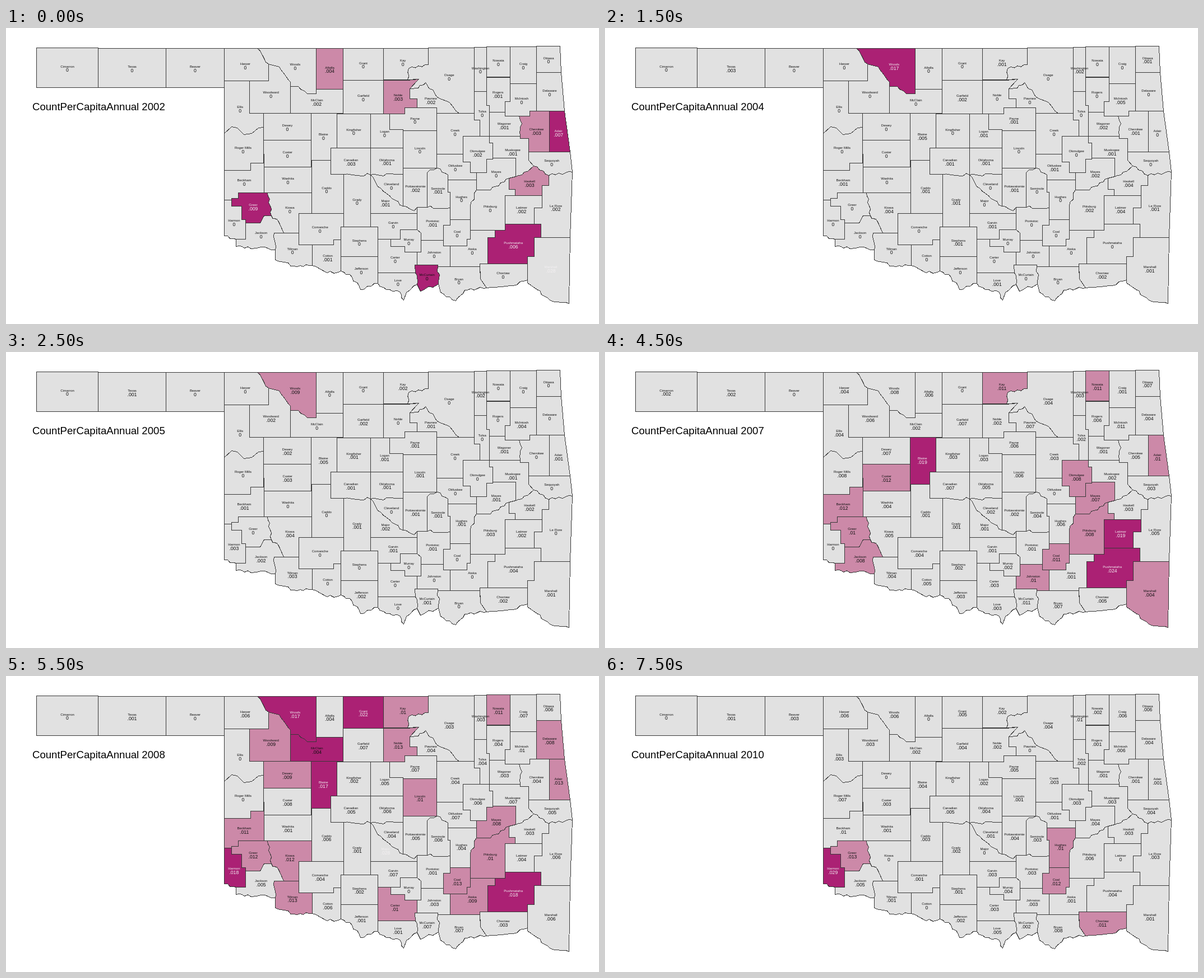
Write an HTML page that moves like this. It is 1058 px wide and 529 px high and loops after 8 s.

```html
<!DOCTYPE html>
<html lang="en">
<head>
<meta charset="utf-8">
<title>Count per capita by county</title>
<style>
html, body { margin: 0; width: 100%; height: 100%; overflow: hidden; background: #fff; }
svg { display: block; width: 100%; height: 100%; font-family: "Liberation Sans", Arial, sans-serif; }
polygon { stroke: #383838; stroke-width: 1; stroke-linejoin: round; shape-rendering: crispEdges; }
#labels { text-anchor: middle; }
.name { font-size: 6px; }
.value { font-size: 8.7px; }
#title { font-size: 18.6px; }
</style>
</head>
<body>
<svg viewBox="0 0 1058 529">
  <g id="shapes" transform="translate(.5 .5)"></g>
  <g id="labels" transform="translate(.5 .5)"></g>
  <text id="title" x="47" y="147"></text>
</svg>
<script>
const FILLS = ['#e1e1e1', '#cc89a8', '#ab2174'];
const INKS = ['#111', '#111', '#f3f0f2'];
const FIRST_YEAR = 2002;

// Known years with the lowest value of the middle and the high class.
const surveys = [
  { year: 2002, limits: [2.7, 6] },
  { year: 2004, limits: [10, 15] },
  { year: 2006, limits: [2.9, 5.2] },
  { year: 2007, limits: [8.2, 15] },
  { year: 2008, limits: [8.2, 16] },
  { year: 2010, limits: [10.2, 20] }
];

// Some outlines carry the data of another county's label.
const swapped = {};
for (const [a, b] of [['McClain', 'Major'], ['Marshall', 'McCurtain'], ['Mayes', 'McIntosh']]) {
  swapped[a] = b;
  swapped[b] = a;
}

const byId = id => document.getElementById(id);
const counties = {};

function add(parent, tag, attrs) {
  const node = document.createElementNS('http://www.w3.org/2000/svg', tag);
  for (const key in attrs) node.setAttribute(key, attrs[key]);
  return byId(parent).appendChild(node);
}

// Seeded by its ends, so that both neighbours get the same river.
function river(from, to) {
  const flipped = from[0] > to[0] || (from[0] === to[0] && from[1] > to[1]);
  const [a, b] = flipped ? [to, from] : [from, to];
  const dx = b[0] - a[0], dy = b[1] - a[1], length = Math.hypot(dx, dy);
  const steps = Math.max(2, Math.round(length / 6));
  const points = [];
  for (let i = 1; i < steps; i++) {
    const noise = Math.sin(a[0] * 12.9 + a[1] * 78.2 + i * 37.7) * 43758;
    const shift = (noise - Math.floor(noise) - .5) * 5 / length;
    points.push([a[0] + dx * i / steps - dy * shift, a[1] + dy * i / steps + dx * shift]);
  }
  return [...(flipped ? points.reverse() : points), to];
}

// "x,y" is a corner, "Hx" and "Vy" straight sides, "~x,y" a river.
function trace(outline) {
  const points = [];
  for (const step of outline.split(' ')) {
    const last = points[points.length - 1];
    const rest = step.slice(1);
    if (step[0] === 'H') points.push([+rest, last[1]]);
    else if (step[0] === 'V') points.push([last[0], +rest]);
    else if (step[0] === '~') points.push(...river(last, rest.split(',').map(Number)));
    else points.push(step.split(',').map(Number));
  }
  return points;
}

function centroid(points) {
  let area = 0, x = 0, y = 0;
  points.forEach(([ax, ay], i) => {
    const [bx, by] = points[(i + 1) % points.length];
    const cross = ax * by - bx * ay;
    area += cross * 3;
    x += (ax + bx) * cross;
    y += (ay + by) * cross;
  });
  return [x / area, y / area];
}

// The series ends with the last survey; earlier missing values are zero.
function county(name, series, outline) {
  const points = trace(outline);
  const [x, y] = centroid(points);
  const shape = add('shapes', 'polygon', { points: points.join(' ') });
  const label = add('labels', 'text', { class: 'name', x, y: y - .5 });
  const value = add('labels', 'text', { class: 'value', x, y: y + 7.3 });
  const known = series.split(' ').map(Number);
  const values = [...Array(surveys.length - known.length).fill(0), ...known];
  label.textContent = name;
  counties[name] = { shape, label, value, values };
}

county('Cimarron', '2 0 0', '54,35 H164 V106 H54');
county('Texas', '3 0 2 1 1', '164,36 H285 V106 H164');
county('Beaver', '3', '285,36 H389 V106 H285');
county('Harper', '4 6 6', '389,36 H448 ~468,64 V94 H389');
county('Woods', '17 1 8 17 6', '448,36 ~468,64 487,69 ~507,96 V104 H521 ~537,117 H553 V36');
county('Alfalfa', '4 0 0 6 4 0', '553,36 H601 V109 H553');
county('Grant', '22 5', '601,36 H673 V93 H601');
county('Kay', '1 4 11 10 2', '673,36 H753 V65 ~718,72 ~716,92 H673');
county('Osage', '1 4 3 4', '753,35 V65 ~718,72 ~716,92 736,91 ~720,108 735,107 ~748,97 ~772,125 790,132 ~808,152 H835 V35');
county('Washington', '2 3 3 3 10', '835,34 H857 V113 H835');
county('Nowata', '1 11 11 2', '857,33 H899 V87 H857');
county('Craig', '1 7 6', '899,33 H946 V99 H899');
county('Ottawa', '1 0 7 6 6', '946,32 H988 990,79 H946');
county('Delaware', '1 4 8.4 4', '946,79 H990 996,148 H946');
county('Woodward', '4 6 9 3', '468,64 487,69 ~507,96 V152 H434 V94 H468');
county('Ellis', '4 0 3', '389,94 H434 V152 H459 V177 450,178 438,188 424,190 412,178 402,176 389,188');
county('McClain', '2 0 1 2 4 2', '507,104 H521 ~537,117 H553 V109 H602 V152 H507');
county('Garfield', '2 3 7 7 4', '601,93 H673 V153 H601');
county('Noble', '3 0 0 2 13 2', '673,93 H716 736,91 ~720,108 V126 H733 V142 H711 V153 H673');
county('Pawnee', '2 0 3 7 4 0', '720,108 735,107 ~748,97 ~772,125 790,132 ~808,152 H768 V142 H733 V126 H720');
county('Rogers', '1 0 1 6 4 1', '857,88 H899 V131 H890 V150 H862 V138 H857');
county('McIntosh', '5 4 11 10 6', '899,99 H946 V148 H934 V157 H890 V131 H899');
county('Tulsa', '2 4 2', '835,113 H857 V138 H862 V193 H845 V164 H835');
county('Wagoner', '1 2 0 1 3 1', '862,150 H890 V157 H915 ~920,171 ~917,193 H862');
county('Cherokee', '3 1 0 5 4 1', '934,148 H969 V221 H932 V197 H917 V193 ~920,171 ~915,157 H934');
county('Adair', '7 0 3 10 13 1', '969,148 H996 1006,221 H969');
county('Dewey', '5 7 9 0', '459,152 H544 V200 H459');
county('Blaine', '5 6 19 17 4', '544,152 H590 V214 H579 V236 H544');
county('Kingfisher', '2 3 2 0', '590,153 H650 V214 H590');
county('Logan', '1 1 3 5 2', '650,153 H684 V181 H708 V214 H650');
county('Payne', '1 1 6 7 5', '711,142 H768 V183 H708 V181 H684 V153 H711');
county('Creek', '3 4 3', '768,152 H835 V164 H845 V193 H815 V225 H768');
county('Lincoln', '2 6 10 1', '708,183 H768 V250 H708');
county('Roger Mills', '8 0 7', '389,188 402,176 412,178 424,190 438,188 450,178 459,177 V241 H436 V254 H389');
county('Custer', '6 12 8 3', '459,200 H544 V248 H460');
county('Canadian', '2.6 1 2 7 5 5', '579,214 H650 V262 ~602,261 H579');
county('Oklahoma', '1 1 1 5 6 4', '650,214 H708 V261 ~650,262');
county('Okmulgee', '2 0 0 8.4 6 3', '815,193 H862 V205 H868 V234 H857 V258 H828 V239 H815');
county('Muskogee', '1 1 1 2 7 3', '862,193 H917 V197 H932 V236 941,246 930,256 ~909,265 V232 H868 V205 H862');
county('Okfuskee', '1 0 0 7 1', '768,225 H815 V239 H828 V258 H839 V271 H788 V262 ~768,250');
county('Sequoyah', '1 3 5 4', '932,221 H1006 1010,257 ~968,263 ~941,246 932,236');
county('Mayes', '2 0 7 8 4', '857,234 H868 V232 H909 V265 897,268 ~864,289 H839 V258 H857');
county('Haskell', '3 4 0 3 3 3', '897,268 909,265 ~930,256 941,246 ~968,263 V281 H956 V299 H908 V288 H897');
county('Beckham', '1 2 12 11 10', '389,254 H436 V241 H460 V294 H414 V304 H402 V307 H389');
county('Washita', '4 1 1', '460,248 H545 V294 H460');
county('Caddo', '1 0 1 6 3', '545,236 H579 V261 H602 V331 H545');
county('Grady', '1 1 1 1 2', '602,261 ~650,262 V355 H602');
county('Cleveland', '2 4 1', '650,262 ~708,261 V318 ~688,304 ~668,286 ~650,262');
county('Major', '1 0 4 1 28 0', '650,262 ~668,286 ~688,304 ~708,318 ~728,326 733,320 V331 H650');
county('Pottawatomie', '2 1 2 2 5 4', '708,250 H768 ~751,258 V320 H733 728,326 ~708,318');
county('Seminole', '1 0 2 4 6 3', '751,258 ~768,250 ~788,262 V293 H792 V321 ~751,320');
county('Hughes', '3 6 4 10.4', '788,271 H839 V289 ~828,316 V342 H792 V293 H788');
county('Pittsburg', '2 4 8.4 10 6', '839,289 H864 ~897,268 V288 H908 V299 H890 V361 H828 V316 ~839,289');
county('Latimer', '2 4 1 19 4 0', '890,299 H956 V321 H942 V350 H890');
county('Le Flore', '2 1 0 5 6 3', '968,263 ~1010,257 1006,374 H954 V350 H942 V321 H956 V281 H968');
county('Greer', '9 0 0 10 12 13', '414,294 H466 ~473,335 H460 453,348 H427 V342 H420 V318 H402 V304 H414');
county('Kiowa', '4 4 5 12 0', '466,294 H545 V331 H522 V366 H495 488,350 ~473,335 ~466,294');
county('Harmon', '5.4 0 18 29', '389,307 H402 V318 H420 V342 H427 V377 H410 ~389,371');
county('Jackson', '4 8.4 5 5', '427,348 H453 460,335 H473 ~488,350 495,366 H478 ~480,396 ~455,391 ~425,393 ~410,390 V377 H427');
county('Tillman', '7 4 13 1', '478,366 H522 V387 H546 V424 ~519,426 ~480,414 V396 ~478,366');
county('Comanche', '1 4 4 1', '522,331 H602 V355 H597 V378 H584 V387 H522');
county('Cotton', '1 0 0 5 6 0', '546,387 H584 V378 H597 V434 ~572,437 ~546,424');
county('Stephens', '1 0 2 2 1', '597,355 H663 V408 H597');
county('Garvin', '1 1 1 7 3', '650,331 H733 V360 H703 V377 H663 V355 H650');
county('Murray', '2 0 4', '703,360 H733 740,366 V400 H711 V390 H686 V377 H703');
county('Carter', '3 10 3', '663,377 H686 V390 H711 V400 H733 V423 H729 730,437 H663');
county('Johnston', '10 3 3', '740,379 H780 V389 H792 V426 H770 V423 H733 V400 H740');
county('Pontotoc', '1 0 2 1 1 3', '733,320 H751 ~792,321 V352 H780 V379 H740 V366 733,360');
county('Coal', '11 13 12', '792,342 H828 V377 H822 V389 H780 V352 H792');
county('Atoka', '1 9 1', '828,361 H872 V374 H859 V421 H845 V426 H792 V389 H822 V377 H828');
county('Pushmataha', '6 0 8 24 18 4', '890,350 H954 V374 H942 V408 H930 V421 H859 V374 H872 V361 H890');
county('Choctaw', '2 3 5 3 11', '845,421 H930 V450 ~905,460 ~857,464 846,448');
county('Marshall', '28 1 1 4 6 1', '942,374 H1006 1004,492 ~970,486 ~947,467 930,455 V408 H942');
county('Jefferson', '4 3 1 2', '597,408 H663 V456 ~632,467 ~617,445 ~597,434');
county('Love', '1 0 3 1 5', '663,437 H730 ~733,458 ~714,472 709,486 ~703,472 ~678,467 ~663,456');
county('McCurtain', '2 11 7 2', '729,423 H770 ~771,457 ~739,470 733,458 ~730,437');
county('Bryan', '1 7 7 8', '770,423 V426 H845 846,448 857,464 ~818,468 ~802,487 ~775,472 771,457 ~770,423');

// Years between two surveys take the mean of both.
function show(year) {
  const next = surveys.findIndex(survey => survey.year >= year);
  const prev = surveys[next].year === year ? next : next - 1;
  const mean = pick => (pick(prev) + pick(next)) / 2;
  const limits = [0, 1].map(k => mean(i => surveys[i].limits[k]));
  const amount = name => mean(i => counties[name].values[i]);
  const rank = name => limits.filter(limit => amount(name) >= limit).length;

  byId('title').textContent = 'CountPerCapitaAnnual ' + year;
  for (const name in counties) {
    const { shape, label, value } = counties[name];
    const thousandths = Math.ceil(amount(name) - .5);
    shape.setAttribute('fill', FILLS[rank(swapped[name] || name)]);
    value.textContent = thousandths > 0 ? String(thousandths / 1000).slice(1) : '0';
    for (const text of [label, value]) text.setAttribute('fill', INKS[rank(name)]);
  }
}

const start = performance.now();
let shown;

function tick() {
  const time = (performance.now() - start) % 8000;
  const year = FIRST_YEAR + Math.floor((time + 500) / 1000);
  if (year !== shown) show(shown = year);
  requestAnimationFrame(tick);
}
tick();
</script>
</body>
</html>
```
